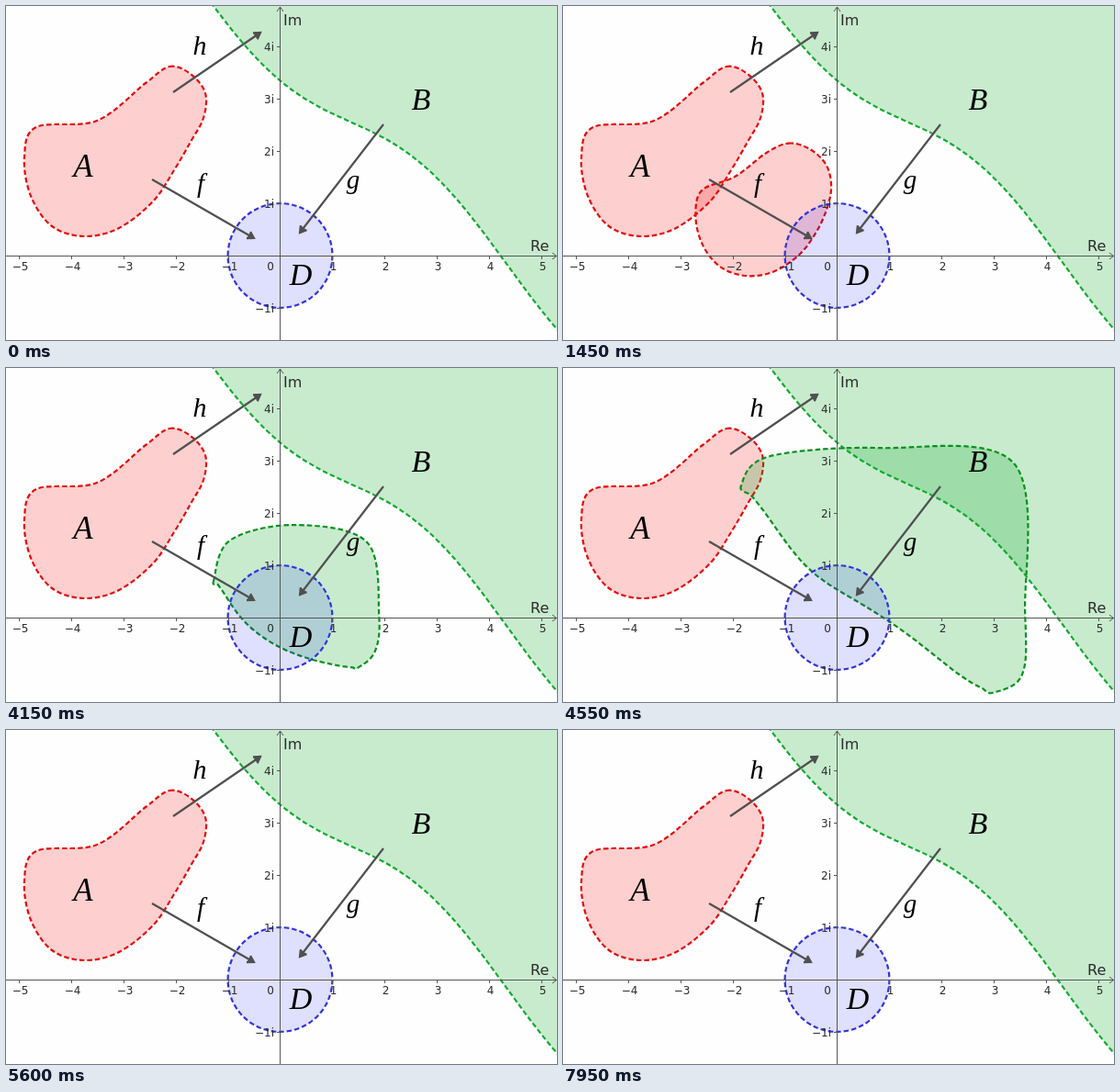
An HTML page with a canvas for the animation above (8 s loop, 600 by 364 pixels).

```html
<!DOCTYPE html>
<html>
<head>
<meta charset="utf-8">
<style>
html, body { margin: 0; width: 100%; height: 100%; overflow: hidden; background: #fefefe; }
canvas { display: block; }
</style>
</head>
<body>
<canvas id="stage" width="600" height="364"></canvas>
<script>
const ctx = document.getElementById('stage').getContext('2d');
const LOOP = 8000, STEP = 50, MORPH = 1650;
const RED_START = 525, GREEN_START = 3940;
const OX = 298.5, OY = 272, UNIT = 56.9;
const RED_FILL = 'rgba(255,0,0,.185)', GREEN_FILL = 'rgba(0,165,30,.21)';

// Each boundary point knows the point of the unit circle it is mapped to.
function boundaryPoint(degrees, x, y) {
  const a = degrees * Math.PI / 180;
  return { x, y, discX: OX + UNIT * Math.cos(a), discY: OY - UNIT * Math.sin(a) };
}

// Key points of A, clockwise from the top, mapped to equal arcs of the circle
const outlineA = [
  [178, 66], [201, 74], [217, 95], [215, 122], [201, 148], [183, 179], [160, 213], [123, 242],
  [85, 251], [50, 240], [27, 207], [20, 165], [33, 132], [99, 125], [152, 84]
];
const regionA = outlineA.map(([x, y], i) => boundaryPoint(90 - i * 360 / outlineA.length, x, y));

// B is bounded by a wavy diagonal and closed far outside the stage.
const waveY = x => 0.91 * x - 215 - 25 * Math.cos(2 * Math.PI * (x - 460) / 340);
const waveAngle = x => 192 + 130 / (1 + Math.exp((465 - x) / 80));
const regionB = [];
for (let x = 110; x <= 690; x += 29) regionB.push(boundaryPoint(waveAngle(x), x, waveY(x)));
regionB.push(
  boundaryPoint(335, 755, 400), boundaryPoint(0, 755, 257), boundaryPoint(40, 745, -120),
  boundaryPoint(90, 425, -131), boundaryPoint(140, 170, -140));

// Closed Catmull-Rom curve through the region's points, moved towards the disc
function regionPath(region, amount = 0) {
  const mix = (from, to) => from + (to - from) * amount;
  const points = region.map(p => [mix(p.x, p.discX), mix(p.y, p.discY)]);
  const n = points.length, at = i => points[(i + n) % n];
  const path = new Path2D();
  path.moveTo(...points[0]);
  for (let i = 0; i < n; i++) {
    const [p, q, r, s] = [at(i - 1), at(i), at(i + 1), at(i + 2)];
    path.bezierCurveTo(
      q[0] + (r[0] - p[0]) / 6, q[1] + (r[1] - p[1]) / 6,
      r[0] - (s[0] - q[0]) / 6, r[1] - (s[1] - q[1]) / 6, r[0], r[1]);
  }
  path.closePath();
  return path;
}

function drawRegion(path, fill, stroke) {
  ctx.fillStyle = fill;
  ctx.fill(path);
  ctx.strokeStyle = stroke;
  ctx.lineWidth = 2.2;
  ctx.setLineDash([5.5, 3]);
  ctx.stroke(path);
  ctx.setLineDash([]);
}

function line(...coords) {
  ctx.beginPath();
  for (let i = 0; i < coords.length; i += 2) ctx.lineTo(coords[i], coords[i + 1]);
  ctx.stroke();
}

function arrow(x1, y1, x2, y2) {
  const a = Math.atan2(y2 - y1, x2 - x1), head = 8;
  const wing = d => [x2 - head * Math.cos(a + d), y2 - head * Math.sin(a + d)];
  ctx.strokeStyle = ctx.fillStyle = '#505050';
  ctx.lineWidth = 2.2;
  line(x1, y1, x2, y2);
  line(...wing(0.55), x2, y2, ...wing(-0.55));
  ctx.fill();
}

function label(text, x, y, size = 12, align = 'center') {
  ctx.font = `${size}px "DejaVu Sans", sans-serif`;
  ctx.textAlign = align;
  ctx.fillStyle = '#2c2c2c';
  ctx.fillText(String(text).replace('-', '−'), x, y);
}

function symbol(text, x, y, size) {
  ctx.font = `italic ${size}px "Liberation Serif", serif`;
  ctx.textAlign = 'center';
  ctx.fillStyle = '#000';
  ctx.fillText(text, x, y);
}

function drawAxes() {
  ctx.strokeStyle = '#555';
  ctx.lineWidth = 1;
  line(0, 272.5, 600, 272.5);
  line(298.5, 1, 298.5, 364);
  line(295, 6, 298.5, 1, 302, 6);
  line(595, 269, 599.5, 272.5, 595, 276);
  for (let n = -5; n <= 5; n++) {
    if (!n) continue;
    const x = Math.round(OX + n * UNIT) + 0.5, y = Math.round(OY - n * UNIT) + 0.5;
    line(x, 272, x, 276);
    label(n, x + 1, 288);
    if (n > -2 && n < 5) {
      line(295, y, 299, y);
      label(n + 'i', 292, y + 4, 12, 'right');
    }
  }
  label(0, 288, 288);
  label('Im', 302, 21, 16, 'left');
  label('Re', 571, 267, 16, 'left');
}

const pathA = regionPath(regionA), pathB = regionPath(regionB);
const disc = new Path2D();
disc.arc(OX, OY, UNIT, 0, Math.PI * 2);

function draw(time) {
  ctx.fillStyle = '#fefefe';
  ctx.fillRect(0, 0, 600, 364);

  const red = (time - RED_START) / MORPH, green = (time - GREEN_START) / MORPH;
  const active = p => p > 0 && p < 1;
  drawRegion(pathA, RED_FILL, '#e60a0a');
  drawRegion(pathB, GREEN_FILL, '#14aa32');
  if (active(green)) drawRegion(regionPath(regionB, 1 - green), GREEN_FILL, '#0a911e');
  if (active(red)) drawRegion(regionPath(regionA, red), RED_FILL, '#e60a0a');
  drawRegion(disc, 'rgba(0,0,255,.12)', '#3232dc');
  drawAxes();

  arrow(159, 189, 270, 253);
  arrow(182, 94, 277, 29);
  arrow(411, 129, 320, 247);
  symbol('A', 84, 186, 35);
  symbol('B', 452, 113, 34);
  symbol('D', 321, 304, 34);
  symbol('f', 212, 203, 29);
  symbol('g', 378, 199, 29);
  symbol('h', 211, 53, 30);
}

function tick() {
  const time = performance.now() % LOOP;
  draw(Math.floor(time / STEP) * STEP);
  requestAnimationFrame(tick);
}
tick();
</script>
</body>
</html>
```
